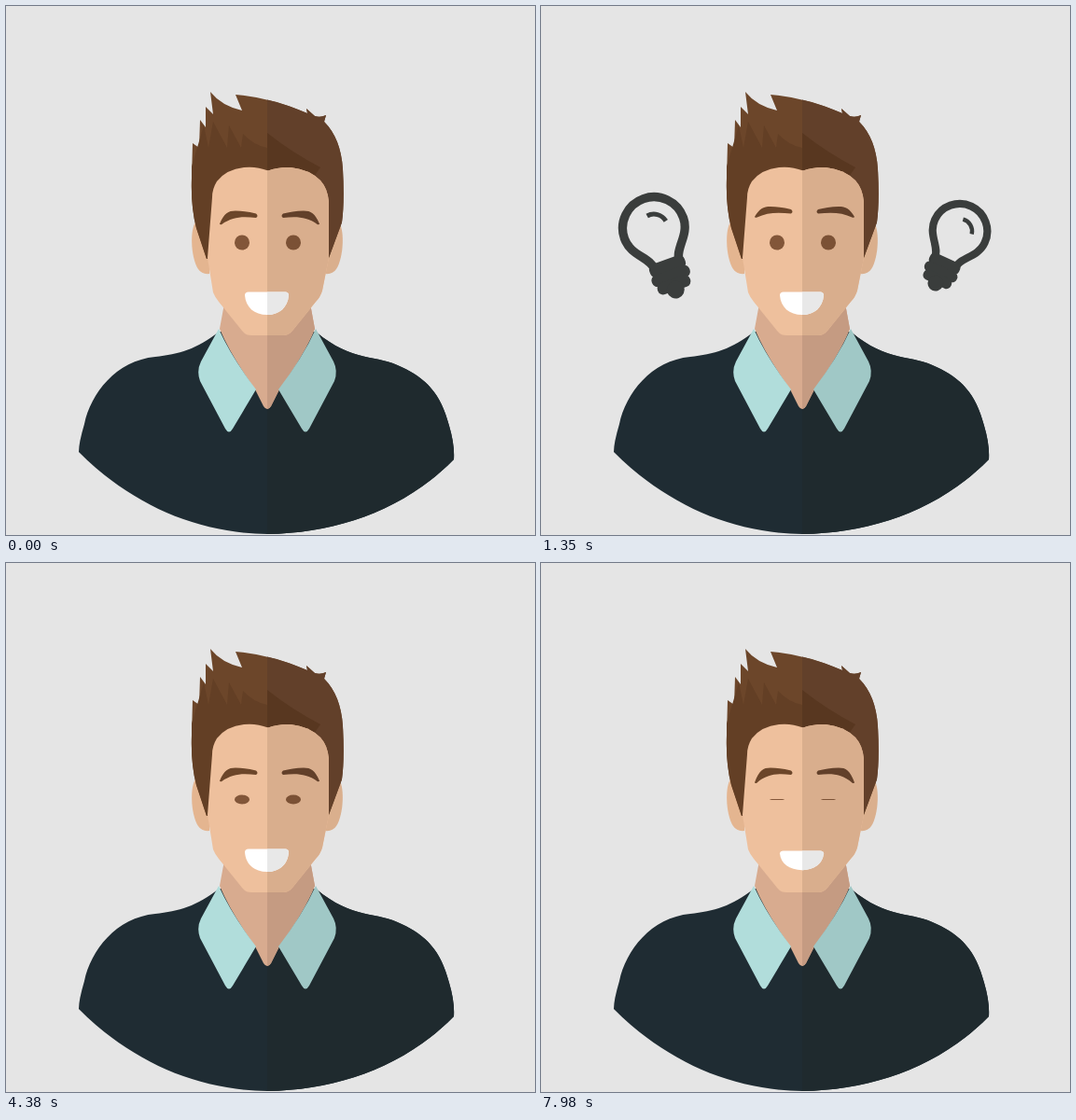
Recreate the animation shown at these times as an HTML page. Size 567 by 567 pixels, loop 8 s.

```html
<!DOCTYPE html>
<html lang="en">
<head>
<meta charset="utf-8">
<title>Bright idea</title>
<style>
html, body { margin: 0; width: 100%; height: 100%; overflow: hidden; background: #e5e5e5; }
svg { display: block; width: 100%; height: 100%; }
</style>
</head>
<body>
<svg viewBox="0 0 567 567">
  <defs>
    <clipPath id="half"><rect x="280" width="287" height="567"/></clipPath>
    <g id="bulb" fill="#3a3d3c" stroke="#3a3d3c" stroke-width="0">
      <path d="M-14 42C-14 28-33.5 20-33.5 0A33.5 33.5 0 0 1 33.5 0C33.5 20 14 28 14 42" fill="none" stroke-width="9.3"/>
      <path d="M-2.5 -14.8A15 15 0 0 1 14.7 -3" fill="none" stroke-width="5"/>
      <rect x="-20" y="36" width="40" height="15" rx="6"/>
      <rect x="-21.5" y="48" width="43" height="13" rx="6"/>
      <rect x="-18.5" y="58" width="37" height="13" rx="6"/>
      <circle cy="70" r="9.5"/>
    </g>
  </defs>
  <g id="figure"></g>
  <path id="browL" fill="#6c462a"/>
  <path id="browR" fill="#62402a" transform="matrix(-1 0 0 1 565 0)"/>
  <ellipse id="eyeL" cx="253" cy="253.5" rx="8" fill="#825639"/>
  <ellipse id="eyeR" cx="308" cy="253.5" rx="8" fill="#7b5135"/>
  <g id="mouth"></g>
  <use id="bulbL" href="#bulb"/>
  <use id="bulbR" href="#bulb"/>
</svg>
<script>
const $ = id => document.getElementById(id);
const path = (parent, d, fill, extra = {}) => {
  const p = document.createElementNS('http://www.w3.org/2000/svg', 'path');
  for (const [k, v] of Object.entries({ d, fill, ...extra })) p.setAttribute(k, v);
  parent.append(p);
};
const flip = { transform: 'matrix(-1 0 0 1 560 0)' };
const split = (parent, d, left, right) => {
  path(parent, d, left);
  path(parent, d, right, { 'clip-path': 'url(#half)' });
};

const fig = $('figure');
const ear = 'M203 232C197 240 198 270 206 282Q210 288 218 287V235Z';
const collar = 'M228 346L209 381Q204 391 208 402L235 453Q239 460 243 453L268 411Q242 377 228 346Z';
// body, neck and collar
split(fig, `M228 349C205 368 185 373 160 376C118 380 91 415 84 448Q78 468 78 478C135 535 205 565 280 566
  C355 565 427 540 480 486Q481 470 475 450C466 415 450 399 424 387C398 373 372 383 332 349Z`, '#1f2c33', '#1f2a2e');
split(fig, 'M236 308L229 346Q240 373 267 411L276 429Q280 435 284 429L293 411Q320 373 331 346L324 308Z', '#d8ab8f', '#c59b82');
path(fig, collar, '#b1dddb');
path(fig, collar, '#a0c8c6', flip);
// ears, hair, shaded locks, then the face on top
path(fig, ear, '#e4b590');
path(fig, ear, '#daaf8d', flip);
split(fig, `M215 271L204 238Q198 215 199 185L200 147L207 152L208 122L214 130L214 108L222 116L219 92
  Q231 107 253 112L246 95Q284 98 323 115L322 110L331 118Q337 120 343 117L341 124
  Q359 142 361 175Q363 210 360 232L346 270Z`, '#6c462a', '#62402a');
path(fig, `M215 271L204 238Q198 215 199 185V172L212 128L217 152L222 124L237 152L239 128L252 152L254 137
  Q265 149 280 152V271Z`, '#633f25');
path(fig, 'M280 136Q305 156 337 173L325 190H280Z', '#583720');
split(fig, `M216 270L221 205Q221 196 226 188Q236 175 255 173Q268 171.5 281 176.5Q291 172.5 305 173
  Q325 175 337 187Q345 196 346 210V270L339 305Q337 312 332 317L307 348Q303 353 297 353H263
  Q257 353 253 348L228 317Q224 312 222 307Z`, '#eec09d', '#d9ae8d');
split($('mouth'), `M256 310Q256 306.5 260 306.5H299Q303 306.5 303 310
  C302 323 293 331 280 331C266 331 257 323 256 310Z`, '#fff', '#e8e8e8');

const LOOP = 8000, STEP = 30;
const part = (t, a, b) => Math.min(1, Math.max(0, (t - a) / (b - a)));
const ease = (t, a, b) => { const x = part(t, a, b); return x * x * (3 - 2 * x); };
const pulse = (t, a, b) => Math.sin(Math.PI * part(t, a, b)) ** 2;
const mix = (a, b, x) => a + (b - a) * x;

const browPath = (top, tip) =>
  `M229 ${tip}C234 ${top + 2.5} 238 ${top} 246 ${top}C254 ${top} 262 ${top + 1.5} 268 ${top + 3}
   Q271 ${top + 5.5} 268 ${top + 7.5}C254 ${top + 6} 243 ${top + 6} 231 ${tip + .7}Q229 ${tip + 1} 229 ${tip}Z`;

// A bulb grows out of (ox, oy); dx, dy lead to its full-size centre.
const placeBulb = (id, k, ox, oy, dx, dy, turn, size) => {
  $(id).setAttribute('visibility', k > .01 ? 'visible' : 'hidden');
  $(id).setAttribute('transform',
    `translate(${ox} ${oy}) scale(${k}) translate(${dx} ${dy}) rotate(${turn}) scale(${size})`);
};
const grow = (t, start, time) =>
  (1 - (1 - part(t, start, start + time)) ** 2) * (1 - part(t, 1500, 1615) ** 2);

function draw(t) {
  const smile = ease(t, 7560, 7980);
  const first = pulse(t, 20, 430);
  const shut = Math.max(first, pulse(t, 1820, 2130), pulse(t, 4240, 4420), pulse(t, 6350, 6620), smile);
  const raise = Math.max(first, ease(t, 1050, 1350) - ease(t, 1820, 2160));
  const squint = Math.max(first, smile);

  const brow = browPath(mix(219.5, 215, raise), mix(233.5, 226, raise) + 1.7 * smile);
  $('browL').setAttribute('d', brow);
  $('browR').setAttribute('d', brow);
  for (const id of ['eyeL', 'eyeR']) $(id).setAttribute('ry', mix(8, .55, shut));
  $('mouth').setAttribute('transform', `translate(0 319) scale(1 ${mix(1, .85, squint)}) translate(0 -319)`);

  placeBulb('bulbL', grow(t, 955, 478), 185, 350, -66, -115.4, -19.5, 1.03);
  placeBulb('bulbR', grow(t, 1231, 175), 395, 350, 60, -121, 25, .98);
}

function frame(now) {
  draw(Math.floor(now % LOOP / STEP) * STEP);
  requestAnimationFrame(frame);
}
draw(0);
requestAnimationFrame(frame);
</script>
</body>
</html>
```
